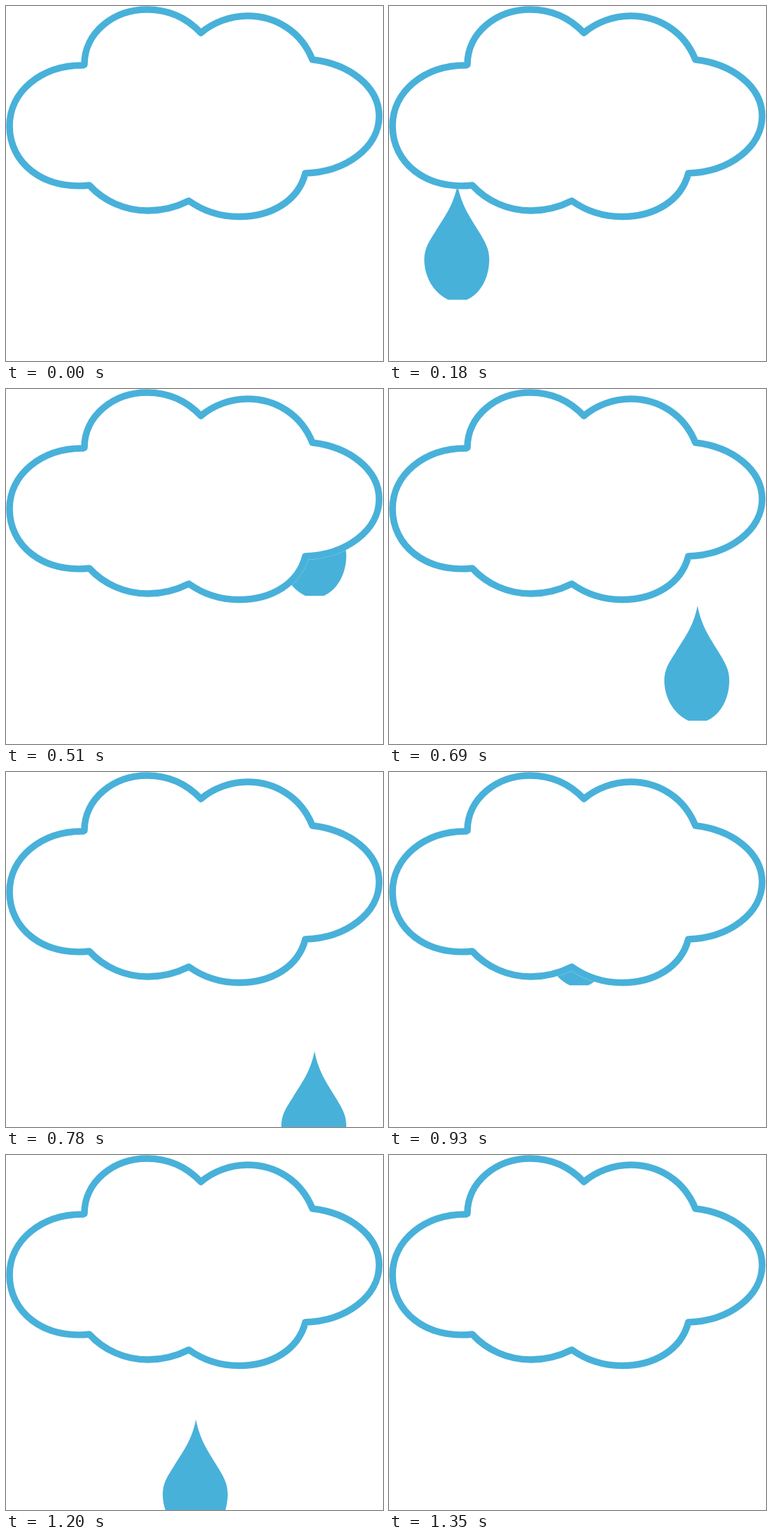
Animation, 534 px wide and 503 px high, one loop 1380 ms. Source, as an HTML page with a canvas:

```html
<!DOCTYPE html>
<html lang="en">
<head>
<meta charset="utf-8">
<title>Rain cloud</title>
<style>
  html, body { margin: 0; width: 100%; height: 100%; overflow: hidden; background: #fff; }
  canvas { display: block; }
</style>
</head>
<body>
<canvas id="stage" width="534" height="503"></canvas>
<script>
const ctx = document.getElementById('stage').getContext('2d');
const BLUE = '#48b1da';
const LOOP = 1380;
const STEP = 30;
const FALL_STEPS = 15;

const cloud = new Path2D(`M111 83
  C111 38 152 5 200 5 C230 5 256 17 276 38
  C294 23 318 14 342 14 C382 14 418 36 434 76
  C486 82 528.5 114 528.5 156 C528.5 200 482 235 424 237
  C414 276 376 298.5 330 298.5 C304 298.5 280 291 259 276
  C241 285 222 290 201 290 C168 290 138 276 118 254
  C52 261 5 222 5 170 C5 121 50 84 109 84 Z`);

// The tip of the drop is the local origin.
const drop = new Path2D(`M0 0
  C-6 32 -22 50 -31 66 C-40 80 -47 90 -47 106
  C-47 128 -36 152 -13 163 L13 163
  C34 154 45 130 45 106 C45 90 39 81 30 66
  C21 50 6 32 0 0 Z`);

// Drops fall one after another, each at a constant speed in px per step.
const drops = [
  { x: 97, top: 84, speed: 28.2 },
  { x: 437, top: 71, speed: 29.5 },
  { x: 269, top: 113, speed: 26.17 }
];

function strokeCloud(color, width) {
  ctx.strokeStyle = color;
  ctx.lineWidth = width;
  ctx.stroke(cloud);
}

function draw(time) {
  const step = Math.floor((time % LOOP) / STEP);
  const current = drops[Math.floor(step / FALL_STEPS)];

  ctx.fillStyle = '#fff';
  ctx.fillRect(0, 0, 534, 503);

  if (current) {
    ctx.save();
    ctx.translate(current.x, current.top + current.speed * (step % FALL_STEPS));
    ctx.fillStyle = BLUE;
    ctx.fill(drop);
    ctx.restore();
  }

  ctx.fillStyle = '#fff';
  ctx.fill(cloud);
  ctx.lineJoin = 'round';
  strokeCloud('rgba(255, 255, 255, 0.25)', 11);
  strokeCloud(BLUE, 9.5);
}

const start = performance.now();
function tick() {
  draw(performance.now() - start);
  requestAnimationFrame(tick);
}
tick();
</script>
</body>
</html>
```
